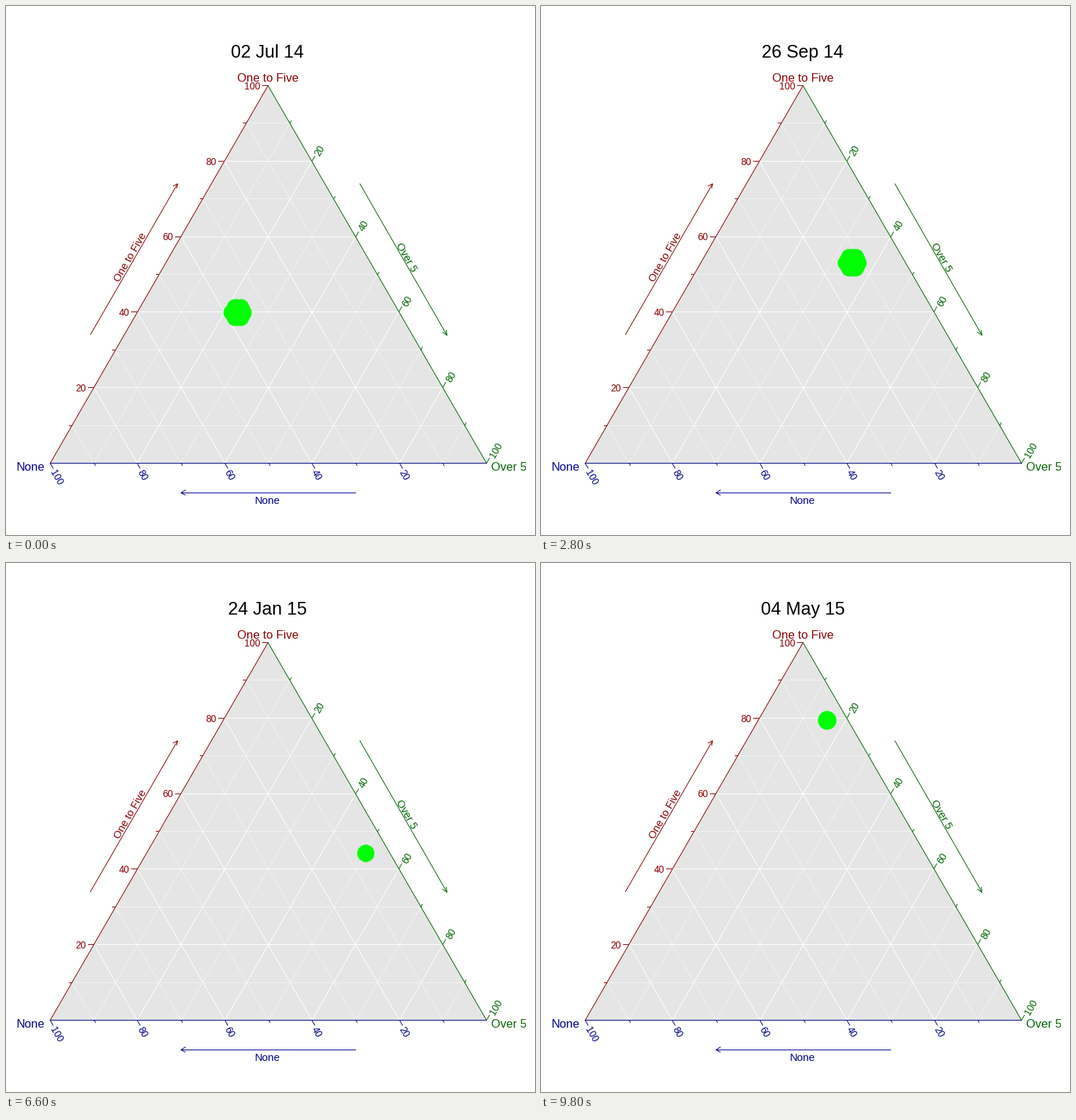
Animation of 748 by 748 pixels, one loop 10 s. Source, as a matplotlib script:

```python
import numpy as np
import matplotlib.pyplot as plt
from matplotlib.animation import FuncAnimation
from matplotlib.patches import Polygon, Rectangle

SIZE, DPI = 748, 64
PX = 72 / DPI  # points per pixel
RED, GREEN, BLUE = "#8B0000", "#006400", "#00008B"
TOP, LEFT, RIGHT = np.array([[370.5, 112.5], [62.5, 646.5], [679.5, 646.5]])

plt.rcParams["font.family"] = "Liberation Sans"
fig = plt.figure(figsize=(SIZE / DPI, SIZE / DPI), dpi=DPI, facecolor="white")
ax = fig.add_axes([0, 0, 1, 1])
ax.set_xlim(0, SIZE)
ax.set_ylim(SIZE, 0)
ax.axis("off")


def heading(deg):
    """Unit vector on screen for a counter-clockwise angle."""
    a = np.radians(deg)
    return np.array([np.cos(a), -np.sin(a)])


def line(points, color, z=2):
    """One pixel wide line through pixel centres."""
    xs, ys = np.transpose(np.floor(points) + 0.5)
    ax.plot(xs, ys, color=color, lw=PX, zorder=z, snap=False,
            solid_capstyle="projecting")


def label(pos, text, size, color, ha="center", rot=0, shift=0):
    """Text whose capitals are centred on pos across the writing line."""
    pos = np.array(pos) + heading(rot - 90) * (0.36 * size + shift)
    return ax.text(*pos, text, fontsize=size * PX, color=color, ha=ha,
                   va="baseline", rotation=rot, rotation_mode="anchor",
                   zorder=5)


def arrow(start, end, color):
    start, end = np.array(start), np.array(end)
    dx, dy = end - start
    back = np.degrees(np.arctan2(-dy, dx)) + 180
    line([start, end], color)
    line([end + 7 * heading(back - 28), end, end + 7 * heading(back + 28)],
         color)


def along(a, b, pct):
    return a + (b - a) * pct / 100


def draw_axis(zero, full, far, color, angle, gap, shift):
    """Grid lines, ticks and numbers of the side from zero to full."""
    upright = angle == 180
    for pct in range(10, 101, 10):
        major = pct % 20 == 0
        p = along(zero, full, pct)
        if pct < 100:
            line([p, along(far, full, pct)],
                 "white" if major else "#F2F2F2", 1.5 if major else 1)
        line([p, p + heading(angle) * (8 if major else 4)], color)
        if major:
            label(p + heading(angle) * gap, str(pct), 13.5, color,
                  "right" if upright else "left",
                  0 if upright else angle, shift)
    line([zero, full], color, 3)


ax.add_patch(Polygon([TOP, LEFT, RIGHT], fc="#E5E5E5", ec="none", zorder=0))
draw_axis(LEFT, TOP, RIGHT, RED, 180, 11, 0.5)
draw_axis(TOP, RIGHT, LEFT, GREEN, 60, 11.5, 1.5)
draw_axis(RIGHT, LEFT, TOP, BLUE, -60, 10.5, 2)

label((370, 101), "One to Five", 16.7, RED)
label((54.5, 651), "None", 16.7, BLUE, "right")
label((686, 651), "Over 5", 16.7, GREEN, "left")
arrow((119, 464), (242, 251), RED)
arrow((500, 251), (623, 465), GREEN)
arrow((494, 688), (247, 688), BLUE)
label((175, 355), "One to Five", 15, RED, rot=60)
label((567, 355), "Over 5", 15, GREEN, rot=-60)
label((369.5, 698.5), "None", 15, BLUE)
ax.add_patch(Rectangle((735, 0), 13, SIZE, color="white", zorder=9))

# Turning points of the spot: frame, x, y, spread of its dots
PATH = np.array([
    (0, 327.5, 433, 9), (7, 322, 441, 8), (16, 307, 420, 6),
    (27, 280.5, 419, 4), (36, 324.5, 415.5, 2.5), (55, 439.8, 362.5, 9.5),
    (83, 550.5, 473, 5), (108, 512, 443, 2), (132, 508.3, 410.2, 1),
    (162, 497.5, 391, 2), (171, 474, 344.2, 2), (183, 432.5, 281.5, 2),
    (196, 404.5, 222, 2)])

# The dots sit on the corners and edge middles of a hexagon
CORNERS = np.array([heading(60 * k) for k in range(6)])
RING = np.vstack([CORNERS, (CORNERS + np.roll(CORNERS, 1, axis=0)) / 2])
RADIUS = 11

START, DAYS, LAST = np.datetime64("2014-07-02"), 306, 196

# Frames that repeat the one before: short stalls and four long pauses
HOLDS = {*range(3, 14, 3), 25, 31, 56, 141, *range(17, 21),
         *range(37, 40), *range(109, 121), *range(LAST + 1, 200)}

title = label((370, 63.5), "", 25.4, "black")
spot = ax.scatter(*RING.T, s=(2 * RADIUS * PX) ** 2, c="#00FF00",
                  linewidths=0, zorder=4)


def draw(n):
    while n in HOLDS:
        n -= 1
    day = round(n * DAYS / LAST)
    title.set_text((START + day).astype(object).strftime("%d %b %y"))
    x, y, spread = (np.interp(n, PATH[:, 0], col) for col in PATH.T[1:])
    spot.set_offsets(RING * spread + (x, y))
    return title, spot


anim = FuncAnimation(fig, draw, frames=200, interval=50, repeat=True,
                     repeat_delay=0, init_func=lambda: draw(0))
plt.show()
```
